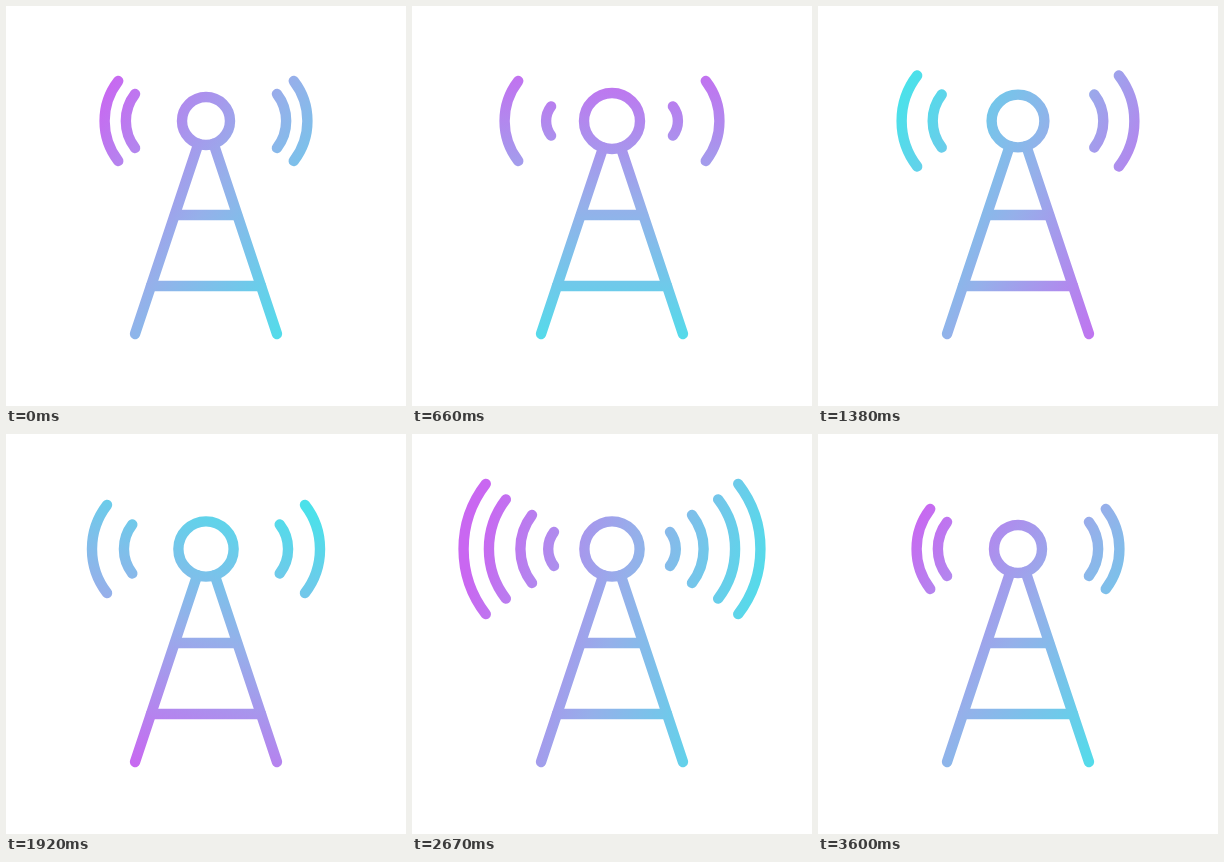
An HTML page with a canvas for the animation above (5.63 s loop, 400 by 400 pixels).

```html
<!DOCTYPE html>
<html lang="en">
<head>
<meta charset="utf-8">
<title>Radio tower</title>
<style>
html, body { margin: 0; width: 100%; height: 100%; overflow: hidden; background: #fff; }
canvas { display: block; width: 100vw; height: 100vh; }
</style>
</head>
<body>
<canvas id="stage"></canvas>
<script>
const LOOP = 5630, ACTIVE = 3600, STEP = 30;
const SPREAD = 37.7 * Math.PI / 180;
const SPEED = 0.076;                 // wave growth per ms
const BIRTH = 10, DEATH = 66.5;      // half height of a wave
const SETTLE = 2670;

// Time in ms, gradient angle in degrees
const TURN = [[0, 35], [660, 90], [1380, 206], [1920, 292], [2340, 343], [2670, 374], [3600, 395]];
// Time in ms, ring pulses so far
const PULSE = [[0, 0], [660, 2.5], [1380, 5.28], [1920, 7.4], [2340, 9.1], [2670, 10.4], [2830, 11]];
// Times at which each passing wave is 24.5 high
const WAVES = [456, 790, 1104, 1354, 1663, 1920, 2136, 2340];
const RESTING = [{ size: 40, from: 34 }, { size: 27, from: 17 }];

const canvas = document.getElementById('stage');
const ctx = canvas.getContext('2d');

// Smooth curve through the keys, flat at both ends
function curve(keys, t) {
  const last = keys.length - 1;
  if (t >= keys[last][0]) return keys[last][1];
  let i = 0;
  while (t >= keys[i + 1][0]) i++;
  const slope = k => k === 0 || k === last ? 0 :
    (keys[k + 1][1] - keys[k - 1][1]) / (keys[k + 1][0] - keys[k - 1][0]);
  const [t0, a] = keys[i], [t1, b] = keys[i + 1];
  const d = t1 - t0, u = (t - t0) / d, v = 1 - u;
  return a * v * v * (1 + 2 * u) + b * u * u * (3 - 2 * u)
    + d * u * v * (v * slope(i) - u * slope(i + 1));
}

function line(x0, y0, x1, y1) {
  ctx.beginPath();
  ctx.moveTo(x0, y0);
  ctx.lineTo(x1, y1);
  ctx.stroke();
}

function wave(half, shift) {
  if (half < BIRTH || half > DEATH) return;
  const r = half / Math.sin(SPREAD), off = 42 - shift;
  for (const [x, mid] of [[200 - off, Math.PI], [200 + off, 0]]) {
    ctx.beginPath();
    ctx.arc(x, 115, r, mid - SPREAD, mid + SPREAD);
    ctx.stroke();
  }
}

function drawWaves(t) {
  for (const at of WAVES) wave(24.5 + (t - at) * SPEED, 0);
  const run = t < 200 ? t * t / 400 : t - 100;
  for (const { size, from } of RESTING) {
    wave(size + run * SPEED, 6 * Math.max(0, 1 - t / 300));
    const gap = size - from, dt = t - SETTLE;
    const half = dt < 0 ? from + dt * SPEED : size - gap * Math.exp(-dt * SPEED / gap);
    wave(half, 6);
  }
}

function drawTower(t) {
  const r = 26 - 2 * Math.cos(2 * Math.PI * curve(PULSE, t));
  ctx.beginPath();
  ctx.arc(200, 115, r, 0, 2 * Math.PI);
  ctx.stroke();
  const len = Math.hypot(71, 213);
  for (const side of [-1, 1]) {
    line(200 + side * 71 * r / len, 115 + 213 * r / len, 200 + side * 71, 328);
  }
  line(169, 209, 231, 209);
  line(145, 280, 255, 280);
}

function paint(t) {
  const a = curve(TURN, t) * Math.PI / 180;
  const dx = 153 * Math.cos(a), dy = 153 * Math.sin(a);
  const fill = ctx.createLinearGradient(200 - dx, 200 - dy, 200 + dx, 200 + dy);
  fill.addColorStop(0, '#c967f1');
  fill.addColorStop(0.5, '#95b0ea');
  fill.addColorStop(1, '#4be1ea');
  ctx.strokeStyle = fill;
  ctx.lineWidth = 10.4;
  ctx.lineCap = 'round';
  drawWaves(t);
  drawTower(t);
}

const start = performance.now();
function tick() {
  const scale = window.devicePixelRatio || 1;
  const w = Math.round(innerWidth * scale), h = Math.round(innerHeight * scale);
  if (canvas.width !== w || canvas.height !== h) {
    canvas.width = w;
    canvas.height = h;
  }
  ctx.setTransform(w / 400, 0, 0, h / 400, 0, 0);
  ctx.fillStyle = '#fff';
  ctx.fillRect(0, 0, 400, 400);
  const t = (performance.now() - start) % LOOP;
  paint(Math.min(ACTIVE, Math.floor(t / STEP) * STEP));
  requestAnimationFrame(tick);
}
tick();
</script>
</body>
</html>
```
